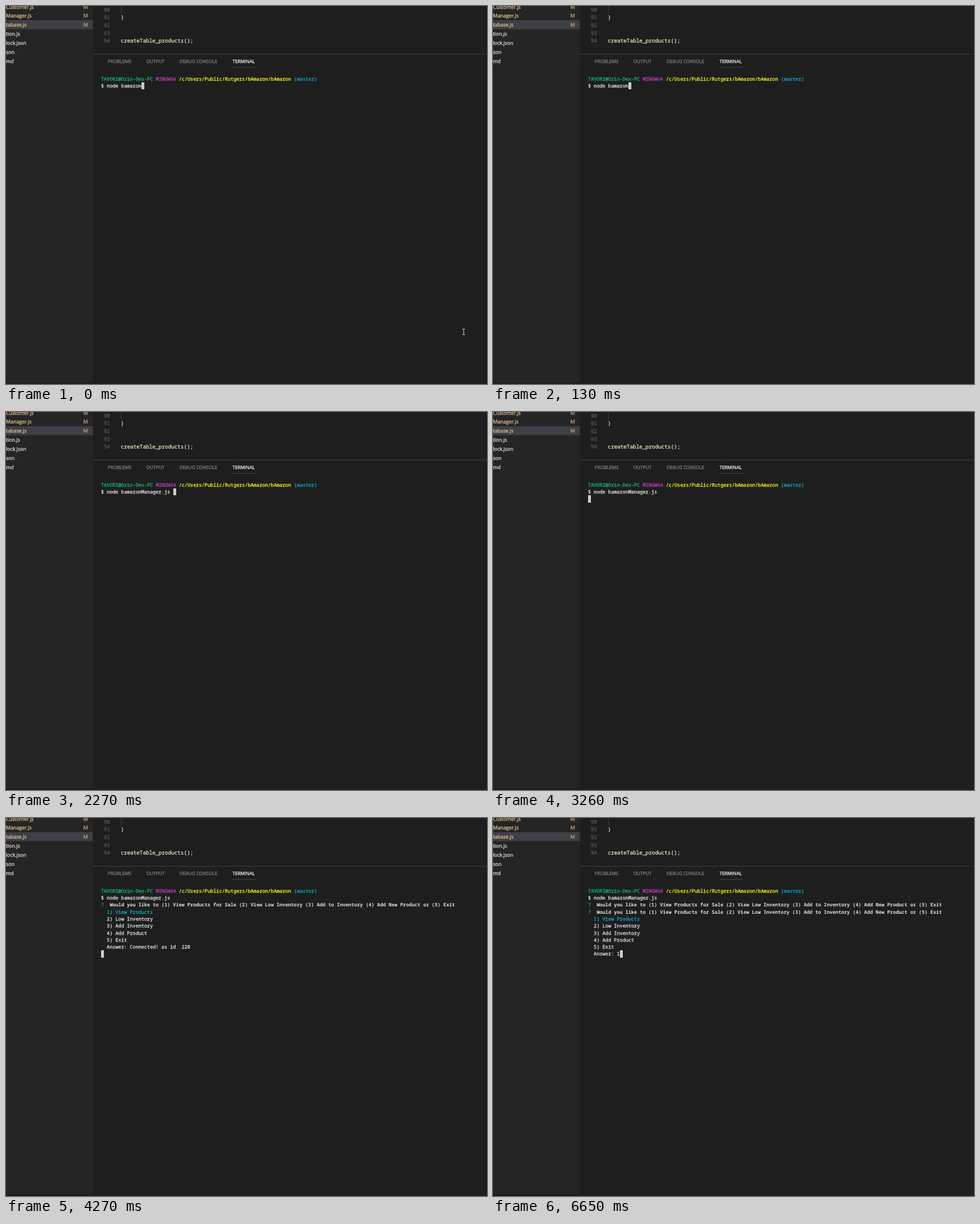
These frames come from a looping animation (845 by 663 pixels, 8000 ms). An HTML page:

```html
<!DOCTYPE html>
<html lang="en">
<head>
<meta charset="utf-8">
<title>Terminal session</title>
<style>
  html, body { margin: 0; height: 100%; overflow: hidden; background: #1e1e1e; }
  svg { display: block; width: 845px; height: 663px; }
  text { white-space: pre; text-rendering: geometricPrecision; stroke-width: .3px; }
  .files { font: 8.75px "Open Sans", sans-serif; }
  .tabs { font: 8.12px "Open Sans", sans-serif; }
  .code { font: 9.23px "Noto Sans Mono", monospace; }
  #terminal { font: 8.43px "Noto Sans Mono", monospace; }
</style>
</head>
<body>
<svg viewBox="0 0 845 663">
  <rect width="845" height="663" fill="#1e1e1e"/>
  <rect width="152.5" height="663" fill="#252526"/>
  <rect y="25" width="152.5" height="15.5" fill="#3f3f46"/>
  <rect y="660" width="845" height="3" fill="#231b1d"/>
  <rect x="153" y="84" width="692" height="1" fill="#414141"/>
  <rect x="398" y="107" width="41" height="1" fill="#454545"/>
  <rect x="202" width="1" height="13" fill="#404040"/>
  <g class="files" id="files"></g>
  <g class="code" id="code"></g>
  <g class="tabs" id="tabs"></g>
  <g id="terminal"></g>
  <path id="pointer" d="M801.5 566.5h2l.5 .5l.5-.5h2M804 567v9M801.5 576.5h2l.5-.5l.5 .5h2" fill="none" stroke="#d8d8d8"/>
</svg>
<script>
const LOOP = 8000;
const CELL = 5.061, LINE = 12.27, LEFT = 167, TOP = 121.9;
const WHITE = '#e2e2e2', GREEN = '#0dbc79', CYAN = '#11a8cd';
const byId = id => document.getElementById(id);
const terminal = byId('terminal');

function add(parent, tag, attributes, content = '') {
  const node = document.createElementNS('http://www.w3.org/2000/svg', tag);
  for (const name in attributes) node.setAttribute(name, attributes[name]);
  node.textContent = content;
  parent.append(node);
}

// The thin stroke gives small type a firmer weight.
function label(parent, x, y, color, content) {
  add(parent, 'text', { x, y, fill: color, stroke: color }, content);
}

// Sidebar, editor and panel tabs
['Customer.js', 'Manager.js', 'tabase.js', 'tion.js', 'lock.json', 'son', 'md'].forEach((name, i) => {
  const y = 4.5 + i * 15.87, modified = i < 3;
  label(byId('files'), 0, y, modified ? '#e2c08d' : '#dcdcdc', name);
  if (modified) label(byId('files'), 136, y, '#c2a278', 'M');
});
for (let n = 90; n <= 94; n++) label(byId('code'), 171.7, 64.4 - (94 - n) * 13.72, '#555555', n);
label(byId('code'), 201.7, 23.2, '#d4d4d4', '}');
label(byId('code'), 201.7, 64.4, '#e3e0b6', 'createTable_products');
label(byId('code'), 312.5, 64.4, '#dcdcdc', '();');
label(byId('tabs'), 178.5, 100.4, '#808080', 'PROBLEMS');
label(byId('tabs'), 246.5, 100.4, '#808080', 'OUTPUT');
label(byId('tabs'), 304.8, 100.4, '#808080', 'DEBUG CONSOLE');
label(byId('tabs'), 398, 100.4, '#f0f0f0', 'TERMINAL');

// Terminal, addressed by row and column
const rowTop = row => Math.round(TOP + row * LINE);

function put(row, column, content, color = WHITE, weight = 400) {
  add(terminal, 'text', {
    x: LEFT + column * CELL, y: rowTop(row) + 9, fill: color,
    stroke: weight > 400 ? 'none' : color, 'font-weight': weight
  }, content);
}

function cursor(row, column) {
  add(terminal, 'rect', {
    x: Math.round(LEFT + column * CELL), y: rowTop(row),
    width: 5, height: rowTop(row + 1) - rowTop(row), fill: '#cccccc'
  });
}

function prompt(command) {
  put(0, 0, 'TAVORI@Orin-Dex-PC', GREEN);
  put(0, 19, 'MINGW64', '#bc3fbc');
  put(0, 27, '/c/Users/Public/Rutgers/bAmazon/bAmazon', '#f8f820');
  put(0, 67, '(master)', CYAN);
  put(1, 0, '$ node ' + command);
}

function question(row) {
  put(row, 0, '?', GREEN);
  put(row, 3, 'Would you like to (1) View Products for Sale (2) View Low Inventory ' +
    '(3) Add to Inventory (4) Add New Product or (5) Exit', '#e0e0e0', 700);
}

function menu(row, answer) {
  question(row);
  ['View Products', 'Low Inventory', 'Add Inventory', 'Add Product', 'Exit'].forEach((item, i) =>
    put(row + 1 + i, 2, `${i + 1}) ${item}`, i ? WHITE : CYAN));
  put(row + 6, 2, 'Answer: ' + answer);
}

function typing(command) {
  prompt(command);
  cursor(1, 7 + command.length);
}

const script = 'bamazonManager.js';
const steps = [
  [0, () => typing('bamazon')],
  [1900, () => typing('bamazonm')],
  [2270, () => typing(script + ' ')],
  [3260, () => { prompt(script); cursor(2, 0); }],
  [4130, () => { prompt(script); menu(2, ''); cursor(8, 10); }],
  [4270, () => { prompt(script); menu(2, 'Connected! as id  220'); cursor(9, 0); }],
  [6650, () => { prompt(script); question(2); menu(3, '1'); cursor(9, 11); }]
];

let shown;
function draw(now) {
  const time = now % LOOP;
  const step = steps.findLast(([start]) => time >= start);
  if (step !== shown) {
    terminal.replaceChildren();
    step[1]();
    shown = step;
  }
  byId('pointer').style.visibility = time < 130 ? 'visible' : 'hidden';
}

const begin = performance.now();
function frame() {
  draw(performance.now() - begin);
  requestAnimationFrame(frame);
}
frame();
</script>
</body>
</html>
```
